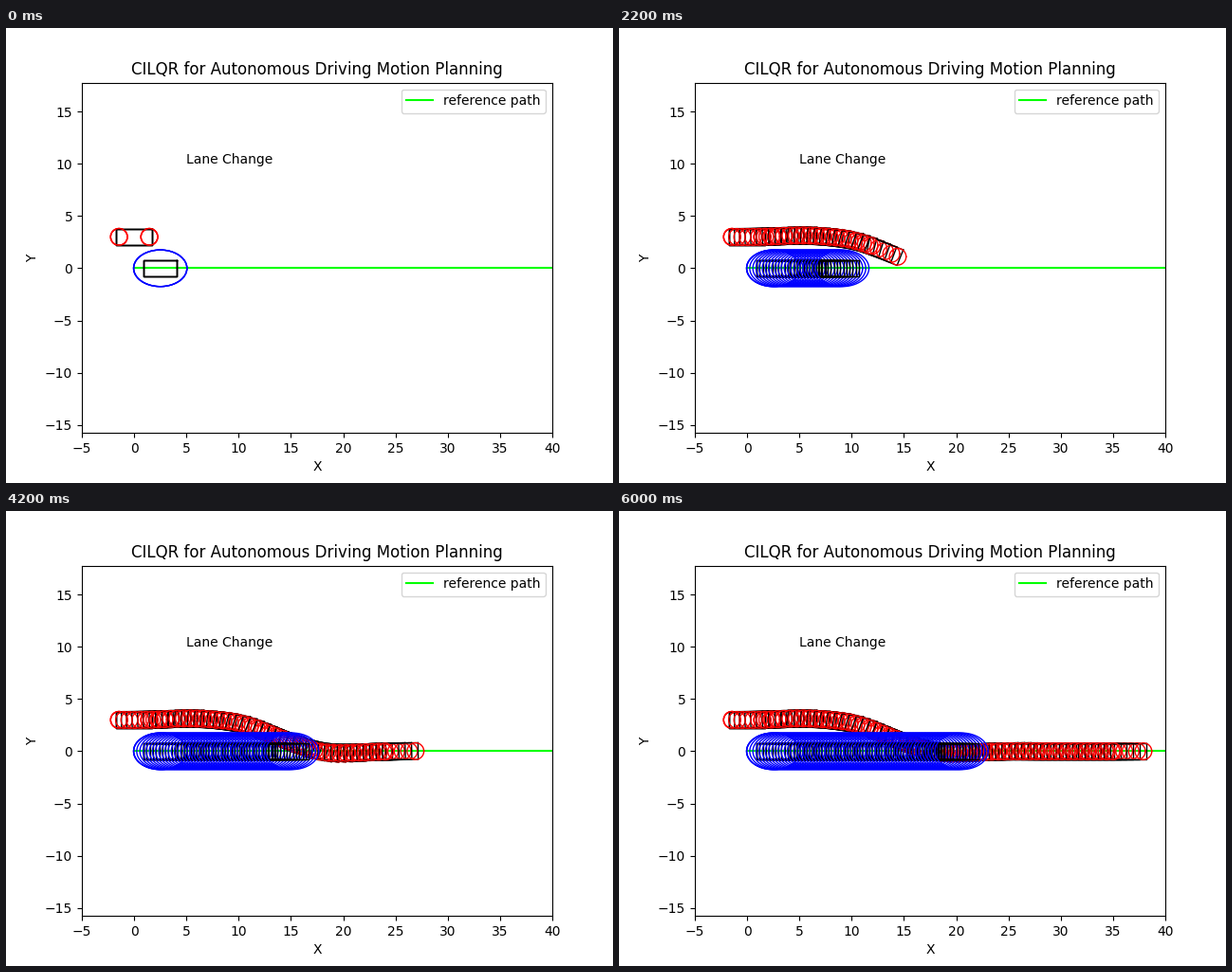
Recreate the animation shown at these times as a matplotlib script. Size 640 by 480 pixels, loop 6100 ms.

```python
import numpy as np
import matplotlib.pyplot as plt
from matplotlib.animation import FuncAnimation

plt.rcParams["font.family"] = "DejaVu Sans"

STEPS = 61
INTERVAL = 100
EGO_LENGTH, EGO_WIDTH = 3.4, 1.6
CIRCLE_OFFSET, CIRCLE_RADIUS = 1.45, 0.8
OBS_LENGTH, OBS_WIDTH = 3.2, 1.6
OBS_START, OBS_STEP = 2.5, 0.3
SAFETY_A, SAFETY_B = 2.55, 1.75

# ego distance per step, at a few step numbers
SPEED_AT = [0, 8, 18, 36, 45, 60]
SPEED = [0.475, 0.615, 0.625, 0.62, 0.609, 0.612]

# slope of the lane change path, at a few x positions
SLOPE_AT = [0, 1.5, 3.5, 5, 7, 9.3, 11.5, 13, 15.5, 17.4, 18.8, 20, 21.5, 24, 26.5]
SLOPE = [0, 0.02, 0.035, 0.005, -0.07, -0.16, -0.34, -0.40, -0.36, -0.24,
         -0.09, -0.01, 0.035, 0.03, 0]


def ego_path():
    """Centre and heading of the ego car at every step."""
    mid = np.arange(STEPS - 1) + 0.5
    x = np.concatenate([[0], np.cumsum(np.interp(mid, SPEED_AT, SPEED))])
    grid = np.linspace(0, 40, 2001)
    slope = np.interp(grid, SLOPE_AT, SLOPE)
    rise = np.cumsum((slope[1:] + slope[:-1]) / 2 * np.diff(grid))
    y = np.interp(x, grid, 3 + np.concatenate([[0], rise]))
    heading = np.arctan(np.interp(x, SLOPE_AT, SLOPE))
    return x, y, heading


def box(x, y, heading, length, width):
    u = np.array([1, 1, -1, -1, 1]) * length / 2
    v = np.array([1, -1, -1, 1, 1]) * width / 2
    c, s = np.cos(heading), np.sin(heading)
    return x + u * c - v * s, y + u * s + v * c


def ellipse(x, y, a, b):
    t = np.linspace(0, 2 * np.pi, 101)
    return x + a * np.cos(t), y + b * np.sin(t)


def outline(points, color):
    return ax.plot(*points, color=color, lw=1, visible=False)[0]


def draw_step(k):
    """Outlines of both vehicles at step k."""
    x, y, heading = ego_x[k], ego_y[k], ego_heading[k]
    lines = [outline(box(x, y, heading, EGO_LENGTH, EGO_WIDTH), "black")]
    for side in (-CIRCLE_OFFSET, CIRCLE_OFFSET):
        cx, cy = x + side * np.cos(heading), y + side * np.sin(heading)
        lines.append(outline(ellipse(cx, cy, CIRCLE_RADIUS, CIRCLE_RADIUS), "red"))
    obs_x = OBS_START + OBS_STEP * k
    lines.append(outline(box(obs_x, 0, 0, OBS_LENGTH, OBS_WIDTH), "black"))
    lines.append(outline(ellipse(obs_x, 0, SAFETY_A, SAFETY_B), "blue"))
    return lines


fig, ax = plt.subplots(figsize=(6.4, 4.8), dpi=100)
ax.plot([0, 60], [0, 0], color="lime", lw=1.5, label="reference path")
ax.set_title("CILQR for Autonomous Driving Motion Planning")
ax.set_xlabel("X")
ax.set_ylabel("Y")
ax.text(5, 10, "Lane Change")
ax.legend(loc="upper right")

ego_x, ego_y, ego_heading = ego_path()
# the starting pose is overlaid three times, which makes it bolder
trail = [draw_step(0) + draw_step(0) + draw_step(0)]
trail += [draw_step(k) for k in range(1, STEPS)]

half_height = 45 * 369.6 / 496 / 2
ax.set_xlim(-5, 40)
ax.set_ylim(1 - half_height, 1 + half_height)
ax.set_xticks(range(-5, 41, 5))
ax.set_yticks(range(-15, 16, 5))


def update(n):
    for k, lines in enumerate(trail):
        for line in lines:
            line.set_visible(k <= n)
    return []


anim = FuncAnimation(fig, update, frames=STEPS, interval=INTERVAL,
                     repeat=True, repeat_delay=0)
plt.show()
```
